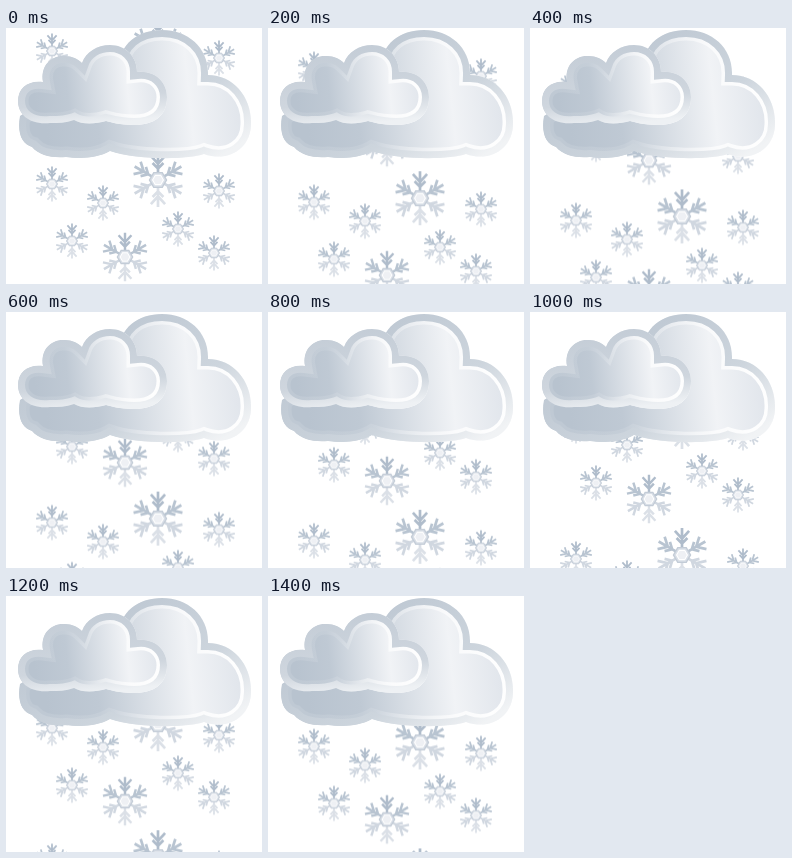
An HTML page that plays this animation: 256x256 px, repeating every 1.6 s.

```html
<!DOCTYPE html>
<html lang="en">
<head>
<meta charset="utf-8">
<title>Snow cloud</title>
<style>
  html, body { margin: 0; width: 100%; height: 100%; overflow: hidden; background: #fff; }
  svg { display: block; width: 100%; height: 100%; }
  .rim { fill: none; stroke-width: 14; }
  .shine { fill: none; stroke: url(#shine); stroke-width: 21; }
  #snow { animation: fall 1600ms steps(8, end) infinite; }
  /* 18.2px per step; the upper copy of the flakes sits one period higher */
  @keyframes fall { to { transform: translateY(145.6px); } }
</style>
</head>
<body>
<svg viewBox="0 0 256 256">
  <defs>
    <linearGradient id="backRim" x1=".15" y1=".3" x2=".9" y2=".95">
      <stop offset="0" stop-color="#bdc7d2"/>
      <stop offset=".6" stop-color="#cdd5dd"/>
      <stop offset="1" stop-color="#f1f3f5"/>
    </linearGradient>
    <linearGradient id="frontRim" x1=".3" y1="0" x2=".5" y2="1">
      <stop offset="0" stop-color="#c3ccd6"/>
      <stop offset=".7" stop-color="#cfd6de"/>
      <stop offset="1" stop-color="#eef1f4"/>
    </linearGradient>
    <linearGradient id="fill" x1=".1" y1=".5" x2="1" y2=".45">
      <stop offset="0" stop-color="#b8c3cf"/>
      <stop offset=".25" stop-color="#bfc9d4"/>
      <stop offset=".7" stop-color="#f1f3f6"/>
      <stop offset="1" stop-color="#dde2e9"/>
    </linearGradient>
    <linearGradient id="shine" x1=".4" y1=".5" x2=".9" y2=".5">
      <stop offset="0" stop-color="#fff" stop-opacity=".1"/>
      <stop offset="1" stop-color="#fff" stop-opacity=".95"/>
    </linearGradient>

    <path id="back" d="M60 129 C46 130 34 128 26 119 C16 116 11 106 14 88 L60 60 L113 40
      C113 16 132 2 156 2 C182 2 203 20 202 47 C228 47 246 70 245 96
      C245 119 224 135 198 126 C182 132 130 132 104 123 C92 130 76 131 60 129 Z"/>
    <path id="front" d="M44 95 C24 97 12 87 12 73 C12 60 22 52 37 54 C34 38 45 27 59 28
      C66 28 72 31 76 35 C80 24 91 17 104 17 C119 17 131 28 131 44
      C149 42 161 54 161 69 C161 88 148 97 128 97 C114 97 104 94 100 93
      C90 96 76 97 68 92 C60 95 52 95 44 95 Z"/>
    <clipPath id="backClip"><use href="#back"/></clipPath>
    <clipPath id="frontClip"><use href="#front"/></clipPath>

    <path id="arm" d="M0 -5 V-19 M-5 -17 L0 -11.5 L5 -17 M-3.8 -12 L0 -8 L3.8 -12"/>
    <g id="flake" fill="none" stroke-width="1.9">
      <use href="#arm" stroke="#afbccb"/>
      <use href="#arm" stroke="#b8c4d1" transform="rotate(60)"/>
      <use href="#arm" stroke="#d0d7e0" transform="rotate(120)"/>
      <use href="#arm" stroke="#dbe0e7" transform="rotate(180)"/>
      <use href="#arm" stroke="#d0d7e0" transform="rotate(240)"/>
      <use href="#arm" stroke="#b8c4d1" transform="rotate(300)"/>
      <path d="M-6 0 L-3 -5.2 H3 L6 0 L3 5.2 H-3 Z" fill="#d9dfe7" stroke="#c3ccd7" stroke-width="1"/>
      <path d="M-3.8 0 L-1.9 -3.3 H1.9 L3.8 0 L1.9 3.3 H-1.9 Z" fill="#eef0f4" stroke="#fff" stroke-width=".8"/>
    </g>
    <g id="flakes">
      <use href="#flake" transform="translate(46 156) scale(.92)"/>
      <use href="#flake" transform="translate(97 175) scale(.92)"/>
      <use href="#flake" transform="translate(152 152) scale(1.42)"/>
      <use href="#flake" transform="translate(213 163) scale(.92)"/>
      <use href="#flake" transform="translate(66 213) scale(.92)"/>
      <use href="#flake" transform="translate(119 229) scale(1.28)"/>
      <use href="#flake" transform="translate(172 201) scale(.92)"/>
      <use href="#flake" transform="translate(208 225) scale(.92)"/>
    </g>
  </defs>

  <g id="snow">
    <use href="#flakes"/>
    <use href="#flakes" y="-133"/>
  </g>

  <g clip-path="url(#backClip)">
    <use href="#back" fill="url(#fill)"/>
    <use href="#back" class="shine"/>
    <use href="#back" class="rim" stroke="url(#backRim)"/>
  </g>
  <g clip-path="url(#frontClip)">
    <use href="#front" fill="url(#fill)"/>
    <use href="#front" class="shine"/>
    <use href="#front" class="rim" stroke="url(#frontRim)"/>
  </g>
</svg>
</body>
</html>
```
